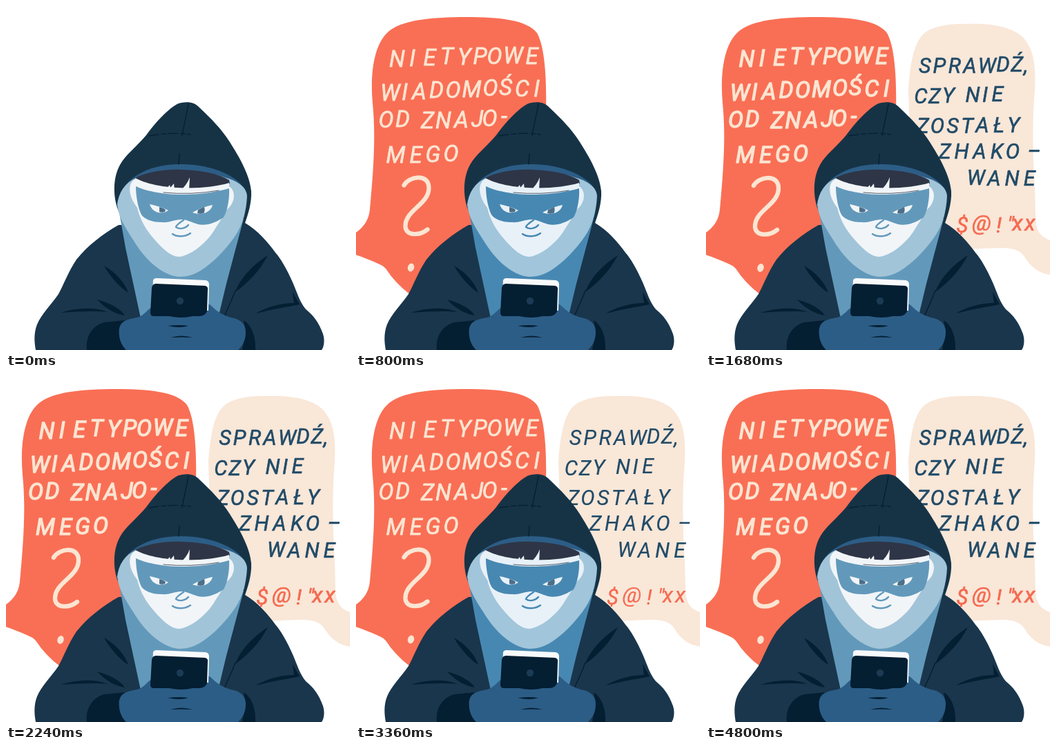
An HTML page that plays this animation: 498x498 px, repeating every 4840 ms.

```html
<!DOCTYPE html>
<html lang="pl">
<head>
<meta charset="utf-8">
<title>Nietypowe wiadomości</title>
<style>
html, body { margin: 0; width: 100%; height: 100%; overflow: hidden; background: #fff; }
svg {
  display: block; width: 100vw; height: 100vh;
  --vest: #6299bb; --rim: #a2c4d8; --face: #f1f5f8; --pen: 1.4px; --thin: .6px;
}
svg.dim { --vest: #4788b2; --rim: #a1c5da; --face: #e8f1f8; --pen: .8px; --thin: .2px; }
svg.dim .ink { transform: translate(.5px, -.5px); }
text {
  font: italic 400 33px Roboto, "Open Sans", sans-serif;
  text-anchor: middle; stroke-width: var(--pen);
  stroke-linejoin: round; paint-order: stroke;
}
.cream { fill: #fbe5d2; stroke: #fbe5d2; }
.navy text { font-size: 30.5px; fill: #214b68; stroke: #214b68; stroke-width: var(--thin); }
.navy .red { font-size: 32px; fill: #f56a50; stroke: #f56a50; }
.vest { fill: var(--vest); }
.rim { fill: var(--rim); }
.face { fill: var(--face); }
.coat { fill: #1a364c; }
.hood { fill: #163346; }
.hair { fill: #2e3546; }
.blue { fill: #2c5d86; }
.dark { fill: #041e32; }
.line { fill: none; stroke-linecap: round; stroke-linejoin: round; }
.seam { stroke: #041e32; stroke-width: 1.3; }
.smile { stroke: var(--vest); stroke-width: 2.4; }
</style>
</head>
<body>
<svg id="stage" viewBox="0 0 498 498">
  <g id="ask">
    <path fill="#f96f55" d="M-6 332C10 322 18 312 20 295C25 240 29 190 24 140C20 95 27 55 46 38C65 20 110 16 160 16C208 16 247 20 262 39C274 60 276 110 275 150L270 330L110 400L82 420C70 412 58 400 50 390C43 379 40 376 32 373C20 367 5 362-6 358Z"/>
    <g class="ink cream">
      <text x="59 81 106 131 156 179 200 227 254" y="88 87 86 84 85 84 84 83 84">NIETYPOWE</text>
      <text x="49 70 91 116 140 167 194 216 240 261" y="137 136 135 133 133 132 130 129 131 131">WIADOMOŚCI</text>
      <text x="43 67 85 103 126 152 175 193 214" y="176 175 176 177 177 176 175 174 171">OD ZNAJO-</text>
      <text x="57 86 111 137" y="227 227 226 225">MEGO</text>
      <path class="line" stroke-width="6.3" style="fill:none" d="M69 260C76 247 105 242 105 264C105 288 70 296 71 320C72 334 92 333 103 324"/>
      <ellipse cx="79" cy="379" rx="4.6" ry="6" stroke="none" transform="rotate(18 79 379)"/>
    </g>
  </g>

  <g id="reply">
    <path fill="#f9e7d8" d="M293 120C296 85 300 52 318 38C338 25 365 26 395 26C425 27 448 34 460 47C476 66 477 90 476 120C472 165 473 210 475 250C477 275 476 300 478 318C482 332 490 338 506 341V389C488 390 473 381 463 366C456 353 446 350 425 350L370 352L300 330Z"/>
    <g class="ink navy">
      <text x="317 338 360 382 407 430 450 463" y="97 97 97 97 97 95 95 96">SPRAWDŹ,</text>
      <text x="311 331 351 368 386 404 422" y="141 141 140 140 139 139 138">CZY NIE</text>
      <text x="314 335 357 378 400 424 445" y="184 184 184 184 183 183 183">ZOSTAŁY</text>
      <text x="346 370 396 421 444 460 475" y="221 221 221 221 221 221 221">ZHAKO –</text>
      <text x="391 417 443 468" y="259 260 260 260">WANE</text>
      <text class="red" x="371 399 424 441 451 469" y="328 325 328 327 325 325">$@!"xx</text>
    </g>
  </g>

  <!-- jacket -->
  <path class="coat" d="M163 317C140 330 118 347 102 367C90 385 84 402 76 417C66 432 51 446 45 461C40 474 41 486 43 498H457C460 494 462 485 459 475C453 458 445 448 434 439C426 430 421 414 415 400C406 380 398 366 390 357C380 343 365 325 346 314Z"/>
  <path class="hood" d="M161 292C155 272 155 248 165 230C173 215 190 203 203 187C215 170 236 147 250 141C261 138 272 138 280 147C297 163 312 178 324 197C338 219 353 245 355 268C356 285 350 303 345 317L310 340H180Z"/>
  <path class="vest" d="M162 288L173 350L195 452H307L319 402L344 308Z"/>
  <path class="blue" d="M160 290C165 250 205 229 252 229C300 229 340 247 349 272L345 306Z"/>
  <path class="rim" d="M161 288C163 270 172 256 188 249Q253 226 323 250C340 256 348 264 349 275C348 298 342 317 333 331C318 354 292 380 272 388C264 391 257 392 250 392C225 390 200 365 185 340C172 320 163 305 161 288Z"/>

  <!-- head -->
  <path class="face" d="M188 250C176 255 176 274 190 292C194 310 204 326 215 338C228 353 240 363 250 363C266 362 288 345 300 327C308 314 314 306 317 297C332 287 334 268 323 261L321 255Z"/>
  <path class="hair" d="M187 249C205 240 230 236 255 237C285 238 308 243 323 252L324 257C290 270 220 270 190 257Z"/>
  <path class="face" d="M187 249L189 262C220 276 290 276 323 265L323 256C292 266 222 268 187 249Z"/>
  <path class="face" d="M231 266L237 259L238 263L243 257L244 267ZM253 267C258 262 263 256 266 248L265 267Z"/>
  <path class="vest" d="M188 261C200 267 225 273 255 273C285 273 310 268 323 264C324 280 320 298 315 306C305 313 290 319 278 316C268 313 262 309 254 309C244 309 238 314 225 313C210 313 200 308 196 302C191 292 188 275 188 261Z"/>
  <path class="line" stroke="#2e3546" stroke-width=".8" d="M228 270Q268 274 308 267"/>
  <path class="face" d="M208 287C218 289 228 292 235 296C228 301 213 302 208 287ZM299 288C290 290 278 294 270 299C280 303 296 301 299 288Z"/>
  <path fill="#4c6f8a" d="M222 291C226 292 229 293 231 295L230 298C227 299 224 299 222 298ZM278 295L287 291C288 294 288 298 286 300C283 301 280 301 277 300Z"/>
  <path class="line smile" d="M257 310C252 313 246 318 246 320C251 324 260 322 264 317M241 330C248 335 260 334 267 329"/>

  <!-- seams and folds -->
  <path class="line seam" d="M264 142C261 160 257 174 255 188M251 214L250 229"/>
  <path class="line seam" stroke-dasharray="14 4 7 3" d="M207 188Q240 182 267 186"/>
  <path class="dark" d="M142 376C150 391 165 408 177 415C172 400 158 385 142 376ZM79 444C105 436 130 436 147 443C130 441 105 442 79 444ZM132 425C150 430 166 438 172 448C160 446 146 440 132 425ZM117 498C115 478 125 463 142 458L172 455L163 468C163 480 167 490 174 498ZM379 361C358 374 339 394 332 414C350 401 367 384 379 361ZM362 445C382 433 404 430 417 430L415 414L425 432C405 436 385 439 362 445ZM344 455C356 462 362 480 361 498H342L347 470Z"/>
  <path class="line seam" d="M332 412C326 428 320 440 316 449"/>

  <!-- hands and phone -->
  <path class="blue" d="M164 470C164 458 172 454 190 451C200 448 204 440 211 436L295 432C305 442 315 449 330 452C342 455 347 463 347 472C347 485 342 492 336 498H174C166 490 163 480 164 470Z"/>
  <path class="dark" d="M236 449Q255 446 270 449Q255 453 236 449ZM234 463Q252 461 264 463Q252 467 234 463ZM238 480Q254 475 270 480Q254 479 238 480Z"/>
  <path fill="#f8f9fa" d="M213 397Q214 394 218 394L289 397Q294 398 294 403L293 441L211 438Z"/>
  <path class="dark" d="M217 402L288 405Q293 406 292 411L291 442Q288 449 280 449H214Q209 449 209 444L211 408Q212 402 217 402Z"/>
  <circle cx="252" cy="427" r="5.2" fill="#1b3a53"/>
</svg>
<script>
const LOOP = 4840, TICK = 40, BLINK = 160;
const stage = document.getElementById('stage');
const bubbles = [
  { el: document.getElementById('ask'), start: 0, x: 140, y: 215 },
  { el: document.getElementById('reply'), start: 1080, x: 390, y: 208 }
];

// damped spring from 0 to 1, back at rest size 280 ms after the start
function pop(ms) {
  if (ms <= 0) return 0;
  if (ms > 600) return 1;
  return 1 - Math.exp(-0.0109 * ms) * Math.cos(1.5 * Math.PI * ms / 280);
}

function draw(now) {
  const t = Math.floor((now % LOOP) / TICK) * TICK;
  stage.classList.toggle('dim', Math.floor(t / BLINK) % 2 === 1);
  for (const { el, start, x, y } of bubbles) {
    const s = pop(t - start);
    el.style.display = s ? '' : 'none';
    el.setAttribute('transform', `translate(${x} ${y}) scale(${s}) translate(${-x} ${-y})`);
  }
}

const begin = performance.now();
function frame() {
  draw(performance.now() - begin);
  requestAnimationFrame(frame);
}
frame();
</script>
</body>
</html>
```
